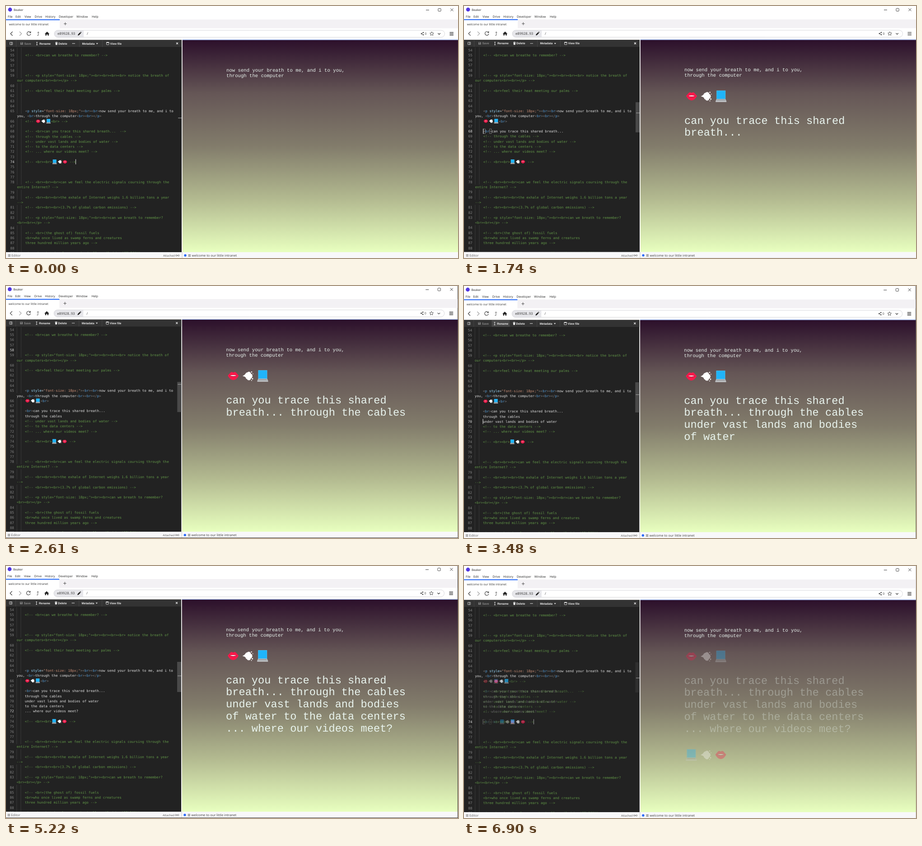
An HTML page with a canvas for the animation above (6960 ms loop, 1001x560 px).

```html
<!DOCTYPE html>
<html lang="en">
<head>
<meta charset="utf-8">
<title>welcome to our little intranet</title>
<style>
html, body { margin: 0; width: 100%; height: 100%; overflow: hidden; background: #fff; }
canvas { display: block; }
</style>
</head>
<body>
<canvas id="stage" width="1001" height="560"></canvas>
<script>
const W = 1001, H = 560, STEP = 870, HOLD = 750, FADE_STEP = 60;
const UI = '"Open Sans", "Noto Sans", sans-serif';
const BOLD = '"Liberation Sans", Arial, sans-serif';
const CODE = '"DejaVu Sans Mono", "Noto Sans Mono", monospace';
const PAGE = '"Courier New", "Liberation Mono", monospace';
const ROW = 11.28, CHAR = 4.56, CODE_SIZE = 7.575, INDENT = 42.7, MARGIN = 24.4;

const phrases = ['can you trace this shared breath...', 'through the cables',
  'under vast lands and bodies of water', 'to the data centers', '... where our videos meet?'];

// Per scene: window drift, current line, caret column (-1: blinked off)
const scenes = [
  { dx: 0, dy: 0, line: 74, caret: 24.5 },
  { dx: -.5, dy: .6, line: 63, caret: 0 },
  { dx: 0, dy: -.2, line: 68, caret: 0, match: true },
  { dx: -.7, dy: -.9, line: 58, caret: -1 },
  { dx: -.7, dy: 0, line: 70, caret: 0 },
  { dx: -.8, dy: -.5, line: 71, caret: -1 },
  { dx: -1, dy: -1, line: 72, caret: -1 },
  { dx: -.6, dy: 0, line: 74, caret: 0, match: true },
];

let g;

function rect(x, y, w, h, color) {
  g.fillStyle = color;
  g.fillRect(x, y, w, h);
}
function text(str, x, y, size, font, color, align = 'left') {
  g.font = `${font === BOLD ? 'bold ' : ''}${size}px ${font}`;
  g.textAlign = align;
  g.fillStyle = color;
  g.fillText(str, x, y);
}
function fill(d, color) {
  g.fillStyle = color;
  g.fill(new Path2D(d));
}
function stroke(d, color = '#333', width = 1) {
  g.strokeStyle = color;
  g.lineWidth = width;
  g.stroke(new Path2D(d));
}
function dot(x, y, r, color) {
  g.fillStyle = color;
  g.beginPath();
  g.arc(x, y, r, 0, 7);
  g.fill();
}
function pill(x, y, w, h, r, color, paint = 'fill') {
  g.fillStyle = g.strokeStyle = color;
  g.lineWidth = .8;
  g.beginPath();
  g.roundRect(x, y, w, h, r);
  g[paint]();
}
function clip(x, y, w, h) {
  g.beginPath();
  g.rect(x, y, w, h);
  g.clip();
}
const bars = (x, y, w, gap, color, width) =>
  stroke([-gap, 0, gap].map(d => `M${x} ${y + d}h${w}`).join(''), color, width);

const icons = {
  '👄'() {
    fill('M-12-1C-9-4-6-9-3.500-9Q-1.500-9 0-7.500Q1.500-9 3.500-9C6-9 9-4 12-1C9 5 5 9 0 9C-5 9-9 5-12-1Z', '#f9184a');
    fill('M-9-.7Q0-3.500 9-.7Q0 2.500-9-.7Z', '#8c1030');
    fill('M-7.500-.9Q0-3.300 7.500-.9Q0 1.300-7.500-.9Z', '#fff');
  },
  '💨'() {
    fill('M-12 0Q-8-2-5-5L0 0L-4 4Q-7 1-12 0Z', '#fff');
    for (const [x, y, r] of [[-1, -3, 5], [2, -5, 4.5], [4, 0, 6], [2, 5, 4.5], [-1, 3, 4],
      [8, -9, 1.3], [11, -5, .9], [10, 6, 1.5], [8, 10, 1]]) dot(x, y, r, '#fff');
  },
  '💻'() {
    rect(-10, -13, 20, 19, '#48bdf2');
    rect(-9, -12, 18, 17, '#1fb4fa');
    fill('M-10 6H10L12 10.500H-12Z', '#b4b9bd');
    fill('M-8.500 7H8.500L9.500 9H-9.500Z', '#989ea3');
    rect(-12, 10.5, 24, 2, '#cfd3d6');
  },
};
function emoji(name, x, y, scale = 1) {
  g.save();
  g.translate(x, y);
  g.scale(scale, scale);
  icons[name]();
  g.restore();
}

const remark = (str, live) => live ? str : `<!-- ${str} -->`;

// Rows starting with ~ are soft-wrapped continuations
const source = s => `
${remark('<br>can we breathe to remember?')}



<!-- <p style="font-size: 18px;"><br><br><br><br> notice the breath of
~our computers<br><br></p> -->

${remark('<br>feel their heat meeting our palms')}



<p style="font-size: 18px;"><br><br>now send your breath to me, and i to
~you, <br>through the computer<br><br></p>
${remark('👄💨💻<br>', s > 0)}

${phrases.map((p, i) => remark(i ? p : `<br>${p} `, s > i + 1)).join('\n')}

${remark('<br><br>💻💨👄', s > 6)}



<!-- <br><br><br>can we feel the electric signals coursing through the
~entire Internet? -->

<!-- <br><br><br>the exhale of Internet weighs 1.6 billion tons a year
~-->
${remark('<br><br><br>(3.7% of global carbon emissions)')}

<!-- <p style="font-size: 18px;"><br><br>can we breath to remember?
~<br><br></p> -->

<!-- <br>(the ghost of) fossil fuels
<br>who once lived as swamp ferns and creatures
three hundred million years ago -->

<!-- <br>what is also now physically veiled by "SILICON"`.split('\n');

function tokens(row) {
  return row.split(/(<[^>]*>)/).flatMap(part => part[0] !== '<' ? [[part, '#e2e2e2']] :
    part.split(/("[^"]*"|<\/?|>|=|style)/).map(t => [t,
      t[0] === '"' ? '#ce9178' : t === 'style' ? '#9cdcfe' :
      t === '=' ? '#d4d4d4' : /[<>]/.test(t) ? '#808080' : '#569cd6']));
}

function drawCode(s, scene) {
  let line = 53, comment = false;
  source(s).forEach((raw, i) => {
    const wrapped = raw[0] === '~', row = wrapped ? raw.slice(1) : raw;
    const y = 100.8 + i * ROW, top = y - 8.4;
    let x = wrapped ? MARGIN : INDENT;
    if (!wrapped) {
      line++;
      const current = line === scene.line;
      text(line, 18.6, y, CODE_SIZE, CODE, current ? '#e0e0e0' : '#858585', 'right');
      rect(MARGIN, top, .8, ROW, '#404040');
      rect(MARGIN + 2 * CHAR, top, .8, ROW, '#404040');
      if (current && scene.match) {
        for (const col of [0, 3]) pill(INDENT + col * CHAR, top + .5, CHAR, ROW - 1, 0, '#888', 'stroke');
      }
      if (current && scene.caret >= 0) rect(INDENT + scene.caret * CHAR - .5, top, 1, ROW, '#eee');
    }
    comment ||= row.startsWith('<!--');
    for (const [token, color] of comment ? [[row, '#629748']] : tokens(row)) {
      for (const piece of token.split(/(👄|💨|💻)/u)) {
        if (icons[piece]) {
          emoji(piece, x + 5.6, y - 2.6, .4);
          x += 11.5;
        } else {
          text(piece, x, y, CODE_SIZE, CODE, color);
          x += piece.length * CHAR;
        }
      }
    }
    if (row.endsWith('-->')) comment = false;
  });
}

function drawChrome(s) {
  if (s === 1) rect(506, -1, 10, 1.2, '#555');
  dot(9, 8, 4.4, '#5138e0');
  text('Beaker', 17, 10.7, 6.6, UI, '#222');
  stroke('M930 9h7M984.500 5.500l6 6m0-6l-6 6', '#222', .9);
  pill(957, 5.5, 6.2, 6.2, 1.2, '#222', 'stroke');
  const menu = { File: 4, Edit: 21, View: 41, Drive: 63.5, History: 87, Developer: 117, Window: 156, Help: 190 };
  for (const name in menu) text(name, menu[name], 26.3, 6.7, UI, '#222');

  rect(119, 30, W, 19.5, '#f3f1f4');
  rect(-2, 29.5, 121, 2, '#1c62f5');
  text('welcome to our little intranet', 6.5, 42.7, 6.5, UI, '#333');
  stroke('M128 39.500h6.500m-3.250-3.250v6.500', '#444', .9);

  stroke('M14.500 57l-4.500 4.500l4.500 4.500', '#333', 1.1);
  stroke('M30 57l4.500 4.500l-4.500 4.500', '#999', 1.1);
  stroke('M54 58.500a4.200 4.200 0 1 0 .8 3.500M54.700 56.500v3h-3', '#333', 1.1);
  stroke('M69 65.500h2.500v-8m-2 2l2-2l2 2', '#555', .9);
  fill('M86 61.700L91 57L96 61.700L95.300 62.300L94.700 61.800V65.700H92.200V63H89.800V65.700H87.300V61.800L86.700 62.300Z', '#222');
  pill(107, 54, 65, 15.5, [8, 0, 0, 8], '#e7e7eb');
  pill(107, 54, 864.5, 15.5, 8, '#cdcdd2', 'stroke');
  text('e89928..93', 114, 64.4, 7.7, UI, '#333');
  fill('M159 65.500l.6-2.600l4.500-4.500l2 2l-4.500 4.500zM164.700 57.800l.8-.8l2 2l-.8.8z', '#222');
  text('/', 179, 64.4, 7.7, UI, '#444');
  stroke('M924 59l-4 2.500l4 2.500', '#444', .8);
  for (const [x, y] of [[920, 61.5], [924, 59], [924, 64]]) dot(x, y, 1.3, '#444');
  text('0', 927.5, 64.2, 7, UI, '#444');
  stroke('M943 57.200l1.300 2.800l3 .3l-2.200 2l.6 3l-2.700-1.500l-2.700 1.500l.6-3l-2.200-2l3-.3z', '#444', .9);
  stroke('M956.500 60.500l2.700 2.700l2.700-2.700', '#333', 1.1);
  bars(982.5, 61.7, 8.5, 3, '#222', 1.2);
}

function drawEditor(s, scene) {
  rect(-2, 75.5, 391, 471.5, '#222');
  g.save();
  clip(-2, 91, 391, 456);
  drawCode(s, scene);
  g.restore();
  if (s) rect(380, 214, 9, 67, '#494949');
  rect(381, 218.8 + (scene.line - 58) * 1.84, 8, 1.2, '#999');

  rect(-2, 75.5, 391, 15.5, '#333');
  if (s === 4) rect(62, 76, 40, 14.5, '#484848');
  for (const x of [22, 162, 213]) rect(x, 76, .8, 15, '#484848');
  pill(8.5, 80.5, 6, 5.5, .5, '#ddd', 'stroke');
  rect(11.5, 80.5, 1, 5.5, '#ddd');
  pill(32, 80.5, 5.5, 5.5, .6, '#888');
  rect(33, 81, 3, 1.5, '#333');
  dot(34.7, 84.3, .9, '#333');
  text('Save', 40.5, 85.6, 6.5, BOLD, '#888');
  stroke('M67 80.500h3m-1.500 0v6m-1.500 0h3', '#eee', .9);
  text('Rename', 74, 85.6, 6.4, BOLD, '#eee');
  fill('M109 80.500h1.500l.5-.7h1.500l.5.7h1.500v1h-5.500zM109.500 82h4.500l-.4 4.500h-3.700z', '#eee');
  text('Delete', 116, 85.6, 6.5, BOLD, '#eee');
  for (const x of [147.5, 149.7, 151.9]) dot(x, 83.4, .8, '#eee');
  text('Metadata', 168.5, 85.6, 6.4, BOLD, '#eee');
  fill('M199.500 82.500h4.500l-2.250 2.500z', '#eee');
  pill(222.5, 80.5, 5.5, 5.5, .5, '#eee', 'stroke');
  rect(222.5, 80.5, 5.5, 1.5, '#eee');
  text('View file', 230.5, 85.6, 6.4, BOLD, '#eee');
  stroke('M377 81.200l4 4m0-4l-4 4', '#eee', 1.2);
}

function drawPage(s) {
  const sky = g.createLinearGradient(0, 76, 0, 547);
  ['#2c102b', '#655656', '#827c6b', '#b3ba90', '#e8ffbf'].forEach((c, i) => sky.addColorStop(i / 4, c));
  rect(390.7, 75.5, W, 471.5, sky);
  rect(390.7, 74.5, W, 1, '#7ea4f0');
  const ink = '#e9f4ee';
  text('now send your breath to me, and i to you,', 488, 145.6, 10.65, PAGE, ink);
  text('through the computer', 488, 157.6, 10.65, PAGE, ink);
  const strip = (names, y) => [...names].forEach((name, i) => emoji(name, 504 + i * 32.6, y));
  if (s > 0) strip('👄💨💻', 201);
  if (s > 6) strip('💻💨👄', 420);
  const poem = phrases.slice(0, Math.max(0, s - 1)).join(' ');
  (poem.match(/\S.{0,27}(?= |$)/g) || []).forEach((row, i) =>
    text(row, 488, 261.7 + i * 26.7, 23.7, PAGE, ink));
}

function drawStatus() {
  rect(-2, 547, W + 4, 15, '#f8f8fa');
  rect(389.5, 547, 1, 15, '#ccc');
  bars(4.5, 554.5, 5.5, 2, '#555', .8);
  text('Editor', 12, 557, 7.4, UI, '#666');
  text('Attached', 348, 556.8, 6.2, UI, '#555');
  pill(375.5, 553, 3.5, 3, 1.5, '#666', 'stroke');
  pill(380.5, 553, 3.5, 3, 1.5, '#666', 'stroke');
  rect(378, 554.2, 3.5, .7, '#666');
  dot(397, 554.3, 2.7, '#2d6df6');
  bars(403.5, 554.5, 5.5, 2, '#444', .8);
  text('welcome to our little intranet', 411.5, 557, 7.4, UI, '#444');
}

function render(scene, s) {
  const layer = document.createElement('canvas');
  layer.width = W;
  layer.height = H;
  g = layer.getContext('2d');
  g.textRendering = 'geometricPrecision';
  // A dark desktop shows past the right and bottom edges as the window drifts
  rect(0, 0, W, H, '#444');
  g.translate(scene.dx, scene.dy);
  clip(-2, -2, W + 2, H + 2);
  rect(-2, -2, W + 2, H + 2, '#fff');
  drawChrome(s);
  drawEditor(s, scene);
  drawPage(s);
  drawStatus();
  return layer;
}

const layers = scenes.map(render);
const screen2d = document.getElementById('stage').getContext('2d');

function frame() {
  const t = performance.now() % (STEP * layers.length);
  const s = Math.floor(t / STEP), late = t % STEP - HOLD;
  screen2d.globalAlpha = 1;
  screen2d.drawImage(layers[s], 0, 0);
  if (late >= 0) {
    screen2d.globalAlpha = late < FADE_STEP ? 1 / 3 : 2 / 3;
    screen2d.drawImage(layers[(s + 1) % layers.length], 0, 0);
  }
  requestAnimationFrame(frame);
}
frame();
</script>
</body>
</html>
```
